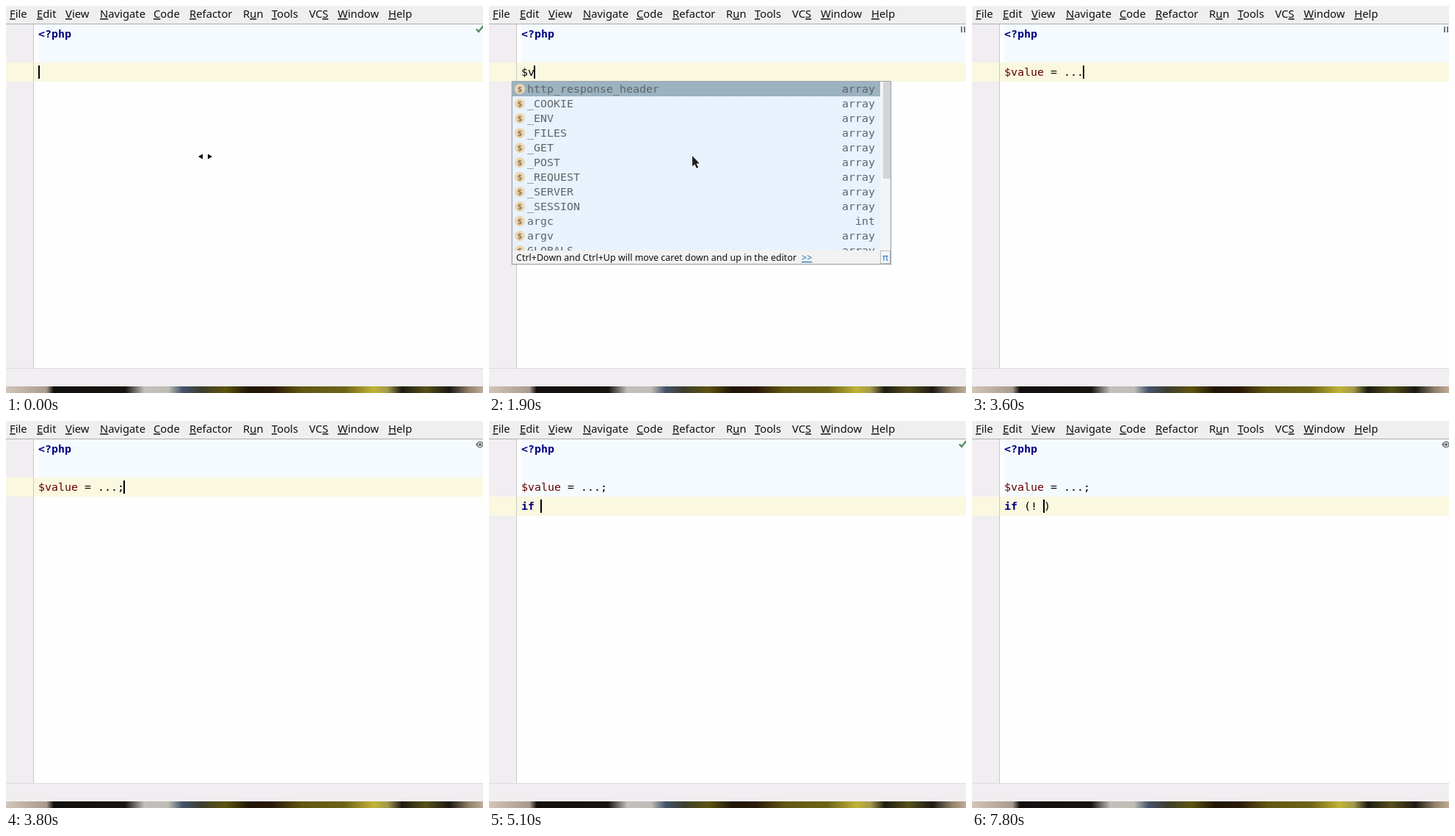
An HTML page that plays this animation: 650x527 px, repeating every 8000 ms.

```html
<!DOCTYPE html>
<html lang="en">
<head>
<meta charset="utf-8">
<title>Editor typing</title>
<style>
  html, body { margin: 0; width: 100%; height: 100%; overflow: hidden; background: #fefefe; }
  svg { display: block; width: 650px; height: 527px; }
  text { white-space: pre; }
  .ui { font: 14.8px "Noto Sans", sans-serif; fill: #111; }
  .mnemonic { text-decoration: underline; text-decoration-thickness: 1px; text-underline-offset: 2px; }
  .code { font: 14.95px "DejaVu Sans Mono", monospace; fill: #000; }
  .key { font-weight: bold; fill: #000080; }
  .var { fill: #660000; }
  .item { font: 14.95px "DejaVu Sans Mono", monospace; fill: #5f6468; }
  .badge { font: bold 10px "DejaVu Sans", sans-serif; fill: #8d7b60; text-anchor: middle; }
  .hint { font: 12.5px "Noto Sans", sans-serif; fill: #111; }
  .link { fill: #2470b8; text-decoration: underline; }
</style>
</head>
<body>
<svg id="stage" viewBox="0 0 650 527">
  <defs>
    <linearGradient id="desk">
      <stop offset="0" stop-color="#d2c5b8"/>
      <stop offset=".085" stop-color="#a89a8d"/>
      <stop offset=".1" stop-color="#120f0e"/>
      <stop offset=".25" stop-color="#171411"/>
      <stop offset=".29" stop-color="#c3c0bd"/>
      <stop offset=".34" stop-color="#bfbcb4"/>
      <stop offset=".37" stop-color="#45536b"/>
      <stop offset=".41" stop-color="#3d3d2d"/>
      <stop offset=".46" stop-color="#5d5410"/>
      <stop offset=".51" stop-color="#1f1506"/>
      <stop offset=".56" stop-color="#2a1908"/>
      <stop offset=".62" stop-color="#615712"/>
      <stop offset=".71" stop-color="#6d6317"/>
      <stop offset=".77" stop-color="#c2b237"/>
      <stop offset=".8" stop-color="#a39a4b"/>
      <stop offset=".83" stop-color="#1d1b12"/>
      <stop offset=".88" stop-color="#57501b"/>
      <stop offset=".93" stop-color="#1c1813"/>
      <stop offset=".97" stop-color="#8f8069"/>
      <stop offset="1" stop-color="#c0ad98"/>
    </linearGradient>
    <pattern id="stripes" width="12" height="12" patternUnits="userSpaceOnUse" patternTransform="rotate(45)">
      <rect width="12" height="12" fill="#e7f2fd"/>
      <rect width="1" height="12" fill="#eef6fe"/>
    </pattern>
    <clipPath id="listClip"><rect x="1" y="1" width="501" height="230"/></clipPath>
  </defs>

  <rect width="650" height="527" fill="#fefefe"/>
  <rect id="block" x="44" y="25" width="606" height="52" fill="#f5faff"/>
  <rect y="25" width="37" height="468" fill="#f0eef0"/>
  <rect id="line" width="650" height="26" fill="#fbf8e0"/>
  <rect x="37" y="25" width="1" height="468" fill="#c9c8c9"/>
  <rect width="650" height="24" fill="#f0eff0"/>
  <rect y="24" width="650" height="1" fill="#aeaeb0"/>
  <rect y="493" width="650" height="25" fill="#f0eef0"/>
  <rect y="493" width="650" height="1" fill="#dcdadc"/>
  <rect y="518" width="650" height="9" fill="url(#desk)"/>
  <g id="menu"></g>

  <text class="code key" x="44" y="43">&lt;?php</text>
  <text class="code" id="row0" x="44" y="95"></text>
  <text class="code" id="row1" x="44" y="121"></text>
  <rect id="caret" width="2" height="18" fill="#000"/>

  <path id="check" d="M641 31.5l3 3.5 6.5-8" fill="none" stroke="#568a5b" stroke-width="2.4"/>
  <path id="pause" d="M643 28h2v8h-2zM647 28h2v8h-2z" fill="#737579"/>
  <g id="eye">
    <path d="M640 32q6-9 12 0q-6 9-12 0z" fill="#74777b"/>
    <circle cx="646" cy="32" r="2.9" fill="#eee"/>
    <circle cx="646" cy="32" r="1.8" fill="#4c4f53"/>
  </g>

  <g id="popup"></g>
  <path id="resize" d="M262 205l6-3.5v7zM281 205l-6-3.5v7z" fill="#000" stroke="#fff" stroke-width="2" paint-order="stroke"/>
  <path id="arrow" d="M277 204v14.5l3.3-3 2.5 5.5 2.4-1.1-2.5-5.4h4.3z" fill="#222" stroke="#fff" stroke-width="1.6" paint-order="stroke"/>
</svg>
<script>
const LOOP = 8000;
const el = id => document.getElementById(id);
const show = (id, on) => el(id).setAttribute("display", on ? "inline" : "none");
const place = (id, attrs) => {
  for (const k in attrs) el(id).setAttribute(k, attrs[k]);
};
const esc = s => s.replace(/&/g, "&amp;").replace(/</g, "&lt;").replace(/>/g, "&gt;");

// An underscore marks the letter that follows as the mnemonic.
const menu = [
  [5, "_File"], [42, "_Edit"], [81, "_View"], [128, "_Navigate"], [201, "_Code"], [250, "_Refactor"],
  [323, "R_un"], [362, "_Tools"], [413, "VC_S"], [452, "_Window"], [521, "_Help"]
];
el("menu").innerHTML = menu.map(([x, label]) =>
  `<text class="ui" x="${x}" y="16">${label.replace(/_(.)/, '<tspan class="mnemonic">$1</tspan>')}</text>`
).join("");

const lists = {
  vars: {
    badge: "$",
    names: "http_response_header _COOKIE _ENV _FILES _GET _POST _REQUEST _SERVER _SESSION argc argv GLOBALS",
    type: name => name === "argc" ? "int" : "array"
  },
  words: {
    badge: "f",
    names: "if array_diff array_diff_assoc array_diff_key array_diff_uassoc array_diff_ukey " +
      "array_udiff array_udiff_assoc array_udiff_uassoc date_diff is_file is_float",
    type: name => name === "if" ? "" : name.startsWith("is") ? "bool" : name.startsWith("date") ? "DateInterval" : "array"
  }
};

function listRow(name, i, list) {
  const y = 16 + i * 20;
  const badge = name === "if" ? "" :
    `<circle cx="11" cy="${y - 5}" r="7" fill="#efd6ae"/><text class="badge" x="11" y="${y - 1}">${list.badge}</text>`;
  return badge + `<text class="item" x="21" y="${y}">${name}</text>` +
    `<text class="item" x="495" y="${y}" text-anchor="end">${list.type(name)}</text>`;
}

function popupMarkup(list) {
  return `<rect x="-1" y="1" width="519" height="250" fill="#000" opacity=".1"/>
    <rect x=".5" y=".5" width="516" height="249" fill="#f2f2f2" stroke="#a2a6aa"/>
    <rect x="1" y="1" width="501" height="230" fill="url(#stripes)"/>
    <rect x="1" y="1" width="501" height="20" fill="#9bb2c1"/>
    <g clip-path="url(#listClip)">${list.names.split(" ").map((n, i) => listRow(n, i, list)).join("")}</g>
    <rect x="502" y="1" width="14" height="230" fill="#f3f4f5"/>
    <rect x="506" y="1" width="10" height="132" fill="#d3d4d5"/>
    <text class="hint" x="6" y="245">Ctrl+Down and Ctrl+Up will move caret down and up in the editor</text>
    <text class="hint link" x="395" y="245">&gt;&gt;</text>
    <rect x="502.5" y="231.5" width="13" height="17" fill="#f5f8fb" stroke="#b4bac0"/>
    <text class="hint" x="505" y="245" style="fill:#2470b8">π</text>`;
}

// Each step changes only the named parts of the state.
const steps = [
  { t: 0, text: "", row: 0, col: 0, caret: true, icon: "check", popup: null, pointer: "resize" },
  { t: 300, caret: false, pointer: null },
  { t: 1000, caret: true },
  { t: 1400, text: "$", col: 1, icon: "eye" },
  { t: 1600, popup: ["vars", 31], pointer: "arrow", icon: "pause" },
  { t: 1900, text: "$v", col: 2 },
  { t: 2000, text: "$va", col: 3, popup: null, pointer: null },
  { t: 2200, text: "$valu", col: 5, icon: "eye" },
  { t: 2300, text: "$value", col: 6 },
  { t: 2500, text: "$value ", col: 7 },
  { t: 2600, text: "$value =", col: 8 },
  { t: 2700, text: "$value = ", col: 9 },
  { t: 3100, text: "$value = .", col: 10 },
  { t: 3200, text: "$value = ..", col: 11 },
  { t: 3300, text: "$value = ...", col: 12 },
  { t: 3400, popup: ["vars", 129], pointer: "arrow", icon: "pause" },
  { t: 3600, popup: null, pointer: null },
  { t: 3700, text: "$value = ...;", col: 13 },
  { t: 3800, icon: "eye" },
  { t: 3900, icon: "check" },
  { t: 4500, text: "$value = ...;\n", row: 1, col: 0, icon: "eye" },
  { t: 4800, text: "$value = ...;\ni", col: 1 },
  { t: 5000, text: "$value = ...;\nif", col: 2, popup: ["words", 22], pointer: "arrow", icon: "pause" },
  { t: 5100, text: "$value = ...;\nif ", col: 3, popup: null, pointer: null, icon: "check" },
  { t: 5800, caret: false },
  { t: 6300, text: "$value = ...;\nif ()", col: 4, caret: true, icon: "eye" },
  { t: 6700, caret: false, icon: "check" },
  { t: 7200, text: "$value = ...;\nif (!)", col: 5, caret: true, icon: "eye" },
  { t: 7700, caret: false, icon: "check" },
  { t: 7800, text: "$value = ...;\nif (! )", col: 6, caret: true, icon: "eye" }
];

const colour = s => esc(s)
  .replace(/^\$val\w*/, m => `<tspan class="var">${m}</tspan>`)
  .replace(/^if(?= )/, '<tspan class="key">if</tspan>');

let drawn = -1;
function draw(time) {
  const t = time % LOOP;
  const count = steps.filter(s => s.t <= t).length;
  if (count === drawn) return;
  drawn = count;

  const s = Object.assign({}, ...steps.slice(0, count));
  const top = 77 + s.row * 26;
  const rows = s.text.split("\n");
  [0, 1].forEach(i => { el("row" + i).innerHTML = colour(rows[i] || ""); });
  place("block", { height: top - 25 });
  place("line", { y: top });
  place("caret", { x: Math.max(44, 43 + s.col * 9), y: top + 4 });
  show("caret", s.caret);
  ["check", "pause", "eye"].forEach(id => show(id, s.icon === id));
  ["resize", "arrow"].forEach(id => show(id, s.pointer === id));
  show("popup", s.popup);
  if (s.popup) {
    const [name, x] = s.popup;
    el("popup").innerHTML = popupMarkup(lists[name]);
    place("popup", { transform: `translate(${x} ${top + 25})` });
  }
}

const start = performance.now();
function tick() {
  draw(performance.now() - start);
  requestAnimationFrame(tick);
}
tick();
</script>
</body>
</html>
```
